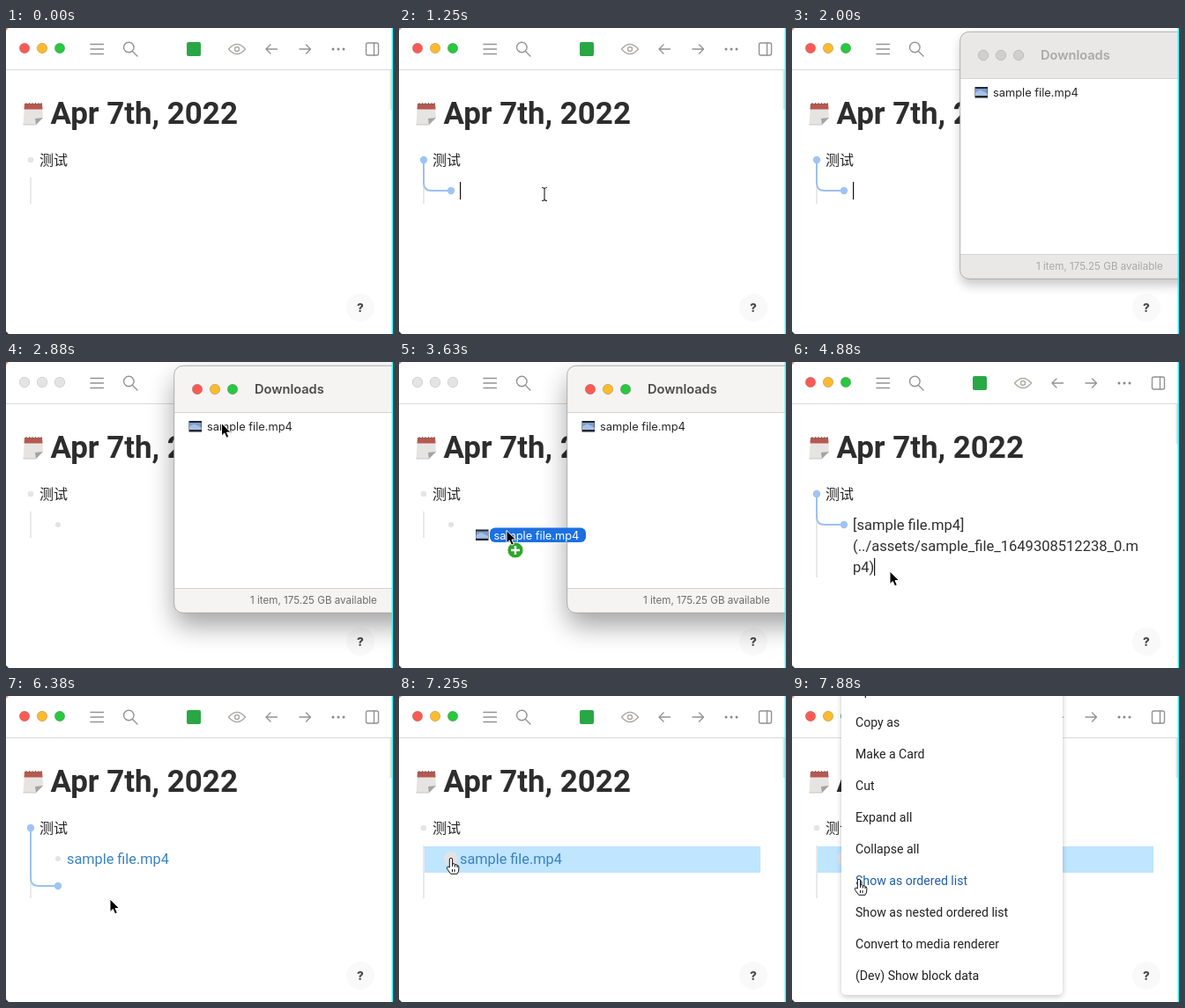
Animation of 439 by 348 pixels, one loop 8 s. Source, as an HTML page:

```html
<!DOCTYPE html>
<html lang="en">
<head>
<meta charset="utf-8">
<title>Drag a file into a journal</title>
<style>
html, body { margin: 0; width: 100%; height: 100%; overflow: hidden; background: #fff; }
svg { display: block; width: 439px; height: 348px; }
text { font-family: Roboto, sans-serif; white-space: pre; }
.ui { font-family: Inter, sans-serif; }
.icon { fill: none; stroke: #939393; stroke-width: 1.4; stroke-linecap: round; stroke-linejoin: round; }
.thread { fill: none; stroke: #9dc1ef; stroke-width: 2; }
.body { font-size: 16.55px; fill: #2f2f2f; }
.menu { font-size: 14.1px; }
</style>
</head>
<body>
<svg id="stage" viewBox="0 0 439 348"></svg>
<script>
const LOOP = 8000, STEP = 125;
const stage = document.getElementById('stage');
const LIGHTS = ['#fb5b54', '#fbbb2f', '#28c840'];

const lights = (id, x, y) => LIGHTS.map((c, i) =>
  `<circle id="${id}${i}" cx="${x + 20 * i}" cy="${y}" r="5.7" stroke-width=".9"/>`).join('');

const thumb = (x, y) => `<g transform="translate(${x} ${y})">
  <rect width="14.500" height="12.500" fill="#23272f"/>
  <rect x=".5" y="2" width="13.500" height="8" fill="#7d9fce"/>
  <path d="M.5 6.500L6 3.500L14 7.500V10H.5Z" fill="#a9c1e4"/></g>`;

const line = (x, y, s, cls, extra = '') => `<text x="${x}" y="${y}" class="${cls}" ${extra}>${s}</text>`;

const items = ['Open in sidebar', 'Copy as', 'Make a Card', 'Cut', 'Expand all', 'Collapse all',
  'Show as ordered list', 'Show as nested ordered list', 'Convert to media renderer', '(Dev) Show block data'];

stage.innerHTML = `
<defs>
  <filter id="deep" x="-30%" y="-30%" width="160%" height="160%"><feGaussianBlur stdDeviation="15"/></filter>
  <filter id="soft" x="-30%" y="-30%" width="160%" height="160%"><feGaussianBlur stdDeviation="6"/></filter>
  <filter id="thin" x="-10%" y="-10%" width="120%" height="120%"><feGaussianBlur stdDeviation="3"/></filter>
</defs>
<rect width="439" height="348" fill="#fff"/>
<path d="M0 47.5H438" stroke="#d9d9d9"/>
${lights('app', 21, 23)}
<g class="icon">
  <path d="M96 18.500H110.500M96 24H110.500M96 29.500H110.500"/>
  <circle cx="139.300" cy="22" r="5.800"/><path d="M143.500 26.500L149 32"/>
  <g stroke="#b3afab"><path d="M252.500 24Q262 13 271.500 24Q262 35 252.500 24Z" style="stroke:#aeaaa6"/><circle cx="262" cy="24" r="2.500" style="stroke:#aeaaa6"/></g>
  <path d="M307.500 24H295M300 19L295 24L300 29"/>
  <path d="M333 24H345.500M340.500 19L345.500 24L340.500 29"/>
  <rect x="408.500" y="17" width="14" height="14" rx="2"/><path d="M417.500 17V31"/>
</g>
<g fill="#888">${[371, 377, 383].map(x => `<circle cx="${x}" cy="24" r="1.500"/>`).join('')}</g>
<rect x="205" y="16" width="16" height="16" rx="2" fill="#2aa745"/>
<rect x="435.500" y="48" width="2.500" height="45" fill="#e3e3e3"/>

<g>
  <path d="M21 87H41L42 102L34 110H19.500Z" fill="#e6e4e2"/>
  <path d="M42 102L34 110L33 103Z" fill="#a5a3a1"/>
  <path d="M21 86H41L41.500 92.500H20.500Z" fill="#b9584f"/>
  <path d="M23 85V88M26.500 85V88M30 85V88M33.500 85V88M37 85V88M40 85V88" stroke="#7d6663" stroke-width="1.100"/>
  <path d="M19.500 110H34" stroke="#bbb" stroke-width=".8"/>
</g>
${line(50.5, 109, 'Apr 7th, 2022', '', 'font-size="34.9" font-weight="700" fill="#2d2d2d"')}

<rect id="picked" x="29" y="171" width="381" height="30" fill="#bfe5ff"/>
<path id="guide" stroke="#e4e4e4" stroke-width="1.600"/>
<circle id="root" cx="28" cy="150" r="3.300" fill="#e5e5e5"/>
<text x="38" y="156" font-size="16" fill="#262626" style="font-family:'Noto Sans CJK SC','Noto Sans CJK',sans-serif">测试</text>
<circle id="halo" cx="59" cy="185" r="8" fill="#e3e3e3"/>
<circle id="leaf" cx="59" cy="185" r="3" fill="#e3e3e3"/>
<g id="thread">
  <path id="wire" class="thread"/>
  <g fill="#9fc4f4"><circle cx="28" cy="150" r="4.200"/><circle id="tip" cx="59" r="4.200"/></g>
</g>
<g id="raw">
  ${line(69, 191, '[sample file.mp4]', 'body')}
  ${line(69, 215, '(../assets/sample_file_1649308512238_0.m', 'body')}
  ${line(69, 239, 'p4)', 'body')}
</g>
<g id="link">${line(69, 191, 'sample file.mp4', '', 'font-size="16.300" fill="#3b82c0"')}</g>
<rect id="caret" width="1.200" height="20" fill="#111"/>

<circle cx="402" cy="318" r="16" fill="#f9f9f9"/>
${line(402, 323, '?', 'ui', 'font-size="13.500" font-weight="800" fill="#4a4a4a" text-anchor="middle"')}

<g id="files">
  <rect id="shadeOn" x="191" y="18" width="300" height="282" rx="12" opacity=".36" filter="url(#deep)"/>
  <rect id="shadeOff" x="191" y="10" width="300" height="283" rx="10" opacity=".2" filter="url(#soft)"/>
  <rect x="191" y="4.500" width="270" height="280.500" rx="10" fill="#fff"/>
  <path id="bar" d="M191 57V14.500Q191 4.500 201 4.500H439V57Z"/>
  <path id="foot" d="M191 257.500V275Q191 285 201 285H439V257.500Z"/>
  <path d="M191 57.500H439M191 257.500H439" stroke="#d4d3d2"/>
  <rect x="190.700" y="4.300" width="270" height="281" rx="10" fill="none" stroke="#aaa" stroke-width=".9"/>
  ${lights('win', 217, 31)}
  ${line(282, 36, 'Downloads', 'ui', 'id="name" font-size="14.600" font-weight="600"')}
  ${thumb(207.500, 67)}
  ${line(228, 78, 'sample file.mp4', 'ui', 'font-size="12.850" fill="#262626"')}
  ${line(277, 275, '1 item, 175.25 GB available', 'ui', 'id="space" font-size="11.600"')}
</g>

<g id="menu">
  <rect x="56" y="-12" width="251" height="354" rx="5" opacity=".22" filter="url(#thin)"/>
  <rect x="56" y="-14" width="251" height="354" rx="5" fill="#fff"/>
  ${items.map((s, i) => line(72, 36 * i - 1, s, 'menu', `id="item${i}" fill="#222"`)).join('')}
</g>

<g id="drag">
  ${thumb(-35, -1)}
  <rect x="-19" y="-3" width="109" height="16.500" rx="6" fill="#1b70e2"/>
  ${line(-14.500, 10, 'sample file.mp4', 'ui', 'font-size="12.850" fill="#fff"')}
</g>
<g id="badge">
  <circle cx="10" cy="22.500" r="9" fill="#2ea52b" stroke="#e8f3e8" stroke-width="1"/>
  <path d="M5 22.500H15M10 17.500V27.500" stroke="#fff" stroke-width="2.400"/>
</g>
<path id="arrow" d="M0 0V14.500L3.300 11.500L5.600 16.800L8.300 15.600L6 10.500H10.600Z" fill="#000" stroke="#fff" stroke-width="1"/>
<path id="beam" d="M-3 -7.500Q0 -7.500 0 -5.500Q0 -7.500 3 -7.500M0 -6V6M-3 7.500Q0 7.500 0 5.500Q0 7.500 3 7.500" fill="none" stroke="#333" stroke-width="1.200"/>
<path id="hand" d="M-1.700 11V2Q-1.700 .3 0 .3Q1.600 .3 1.600 2V7Q4 5.800 4.400 7.800Q6.800 6.800 7 9Q8.800 8.500 8.800 10.500V13Q8.800 16 7 18.300H-.3L-4.500 12.500Q-5.300 10.300 -3.300 10.100Z M1.600 7V10M4.400 8V10.500M7 9V11M1.500 13V16M4 13V16" fill="#fff" stroke="#111" stroke-width="1"/>

<path d="M438.300 0V348" stroke="#1ffafd" stroke-width="1.500"/>
<path d="M0 0H3L0 3Z" fill="#d98b70"/><path d="M0 348H3L0 345Z" fill="#333"/>`;

const el = {};
stage.querySelectorAll('[id]').forEach(n => el[n.id] = n);
const set = (id, attrs) => { for (const k in attrs) el[id].setAttribute(k, attrs[k]); };
const show = (id, on) => set(id, { display: on ? 'inline' : 'none' });

// Pointer runs: each is a list of [time, x, y] stops followed by its end time.
const runs = [
  { end: 1875, stops: [[125, 428, 290], [500, 300, 225], [875, 130, 186], [1125, 130, 186], [1250, 165, 189], [1750, 425, 218]] },
  { end: 4500, stops: [[2375, 330, 190], [2500, 244.5, 69.5], [2875, 244.5, 69.5], [3000, 209, 104], [3500, 134, 185], [3625, 122, 191.5], [4125, 106, 228]] },
  { end: 5625, stops: [[4500, 106, 228], [4875, 111, 238], [5250, 125.5, 237]] },
  { end: 8000, stops: [[6375, 118, 231], [6875, 59, 184], [7625, 59, 184], [7750, 67, 197], [7875, 76, 208]] }
];

function pointer(t) {
  const run = runs.find(r => t >= r.stops[0][0] && t < r.end);
  if (!run) return null;
  const s = run.stops, i = s.findIndex(p => p[0] > t);
  if (i < 0) return s[s.length - 1].slice(1);
  const [a, b] = [s[i - 1], s[i]], k = (t - a[0]) / (b[0] - a[0]);
  return [a[1] + (b[1] - a[1]) * k, a[2] + (b[2] - a[2]) * k];
}

function paintLights(id, on, off, rim) {
  LIGHTS.forEach((c, i) => set(id + i, { fill: on ? c : off, stroke: on ? 'rgba(0,0,0,.2)' : rim }));
}

function render(now) {
  const t = Math.floor(now % LOOP / STEP) * STEP;
  const within = (a, b) => t >= a && t < b;
  const winOn = within(2125, 4500), split = t >= 5875;

  paintLights('app', !winOn, '#e5e4e4', '#d0d0d0');
  paintLights('win', winOn, '#d0cfce', '#bdbcbb');
  show('files', within(2000, 4750));
  set('files', { opacity: t >= 4625 ? .5 : 1 });
  show('shadeOn', winOn);
  show('shadeOff', !winOn);
  set('bar', { fill: winOn ? '#f6f4f3' : '#e9e8e7' });
  set('foot', { fill: winOn ? '#f6f4f3' : '#e9e8e7' });
  set('name', { fill: winOn ? '#4b4b4b' : '#aaa9a8' });
  set('space', { fill: winOn ? '#6d6c6b' : '#a9a8a7' });

  const y = split ? 216 : 185;
  show('thread', within(1000, 2125) || within(4500, 7250));
  set('wire', { d: `M28 150V${y - 9}Q28 ${y} 37 ${y}H59` });
  set('tip', { cy: y });
  set('guide', { d: `M28 170V${split ? 230 : t >= 4500 ? 245 : 200}` });
  show('leaf', winOn || split);
  show('halo', t >= 6875);
  show('raw', within(4500, 5875));
  show('link', split);
  show('picked', t >= 7250);
  show('menu', t >= 7375);
  set('item6', { fill: t >= 7875 ? '#1d5fa8' : '#222' });

  const blink = start => Math.floor((t - start) / 500) % 2 === 0;
  show('caret', within(1000, 2125) && blink(1000) || within(4500, 5375) || within(5875, 7250) && blink(5875));
  set('caret', within(4500, 5875) ? { x: 93, y: 223 } : { x: 69, y: y - 10 });

  const p = pointer(t);
  const kind = !p ? '' : t >= 6875 ? 'hand' : within(875, 1500) || within(5250, 5625) ? 'beam' : 'arrow';
  const dragging = within(3000, 4500);
  for (const id of ['arrow', 'beam', 'hand', 'drag', 'badge']) {
    show(id, id === kind || id === 'drag' && dragging || id === 'badge' && dragging && p[0] < 190);
    if (p) set(id, { transform: `translate(${p[0]} ${p[1]})` });
  }
}

const start = performance.now();
function tick() {
  render(performance.now() - start);
  requestAnimationFrame(tick);
}
tick();
</script>
</body>
</html>
```
